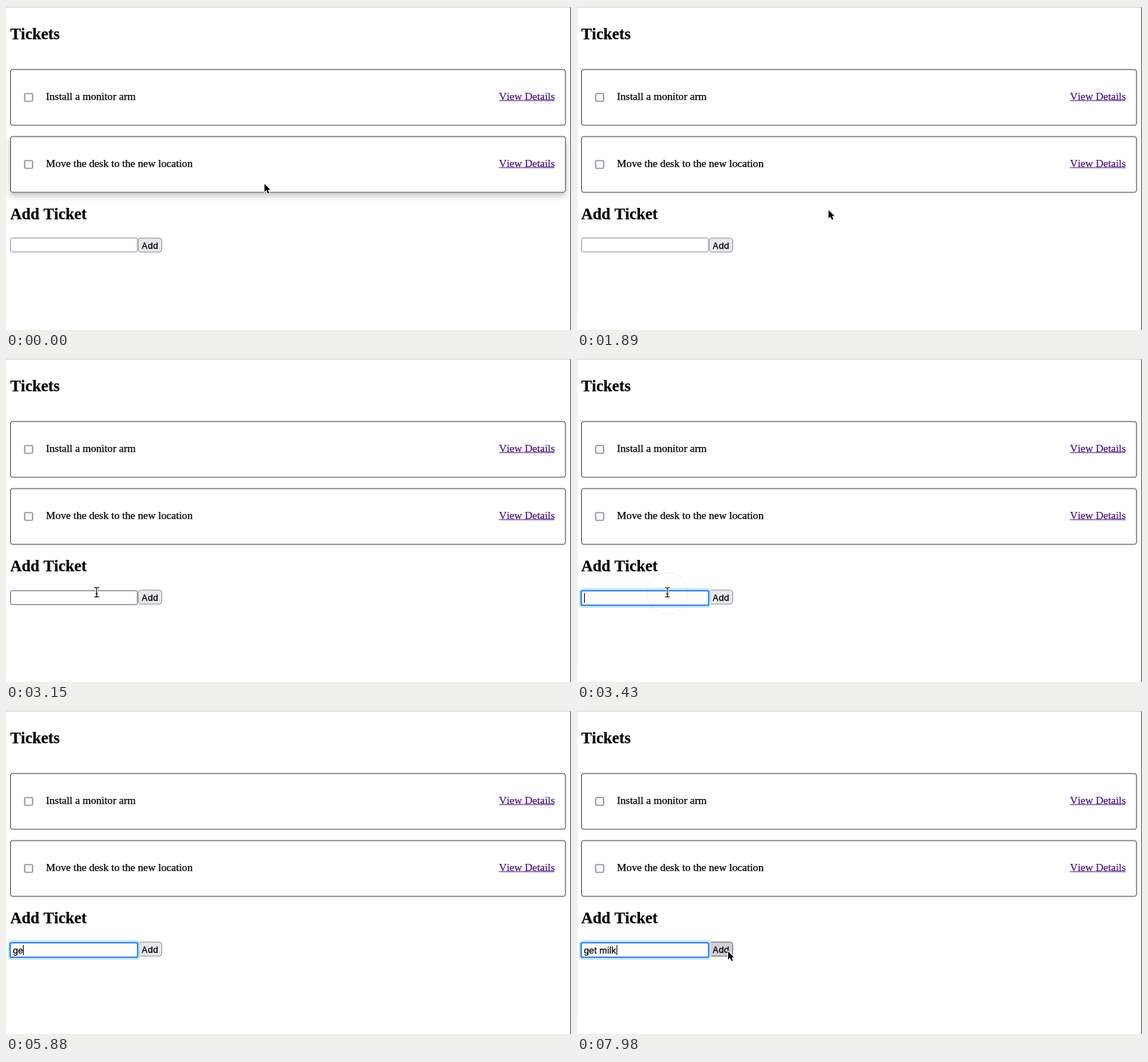
Recreate the animation shown at these times as an HTML page with a canvas. Size 800 by 459 pixels, loop 8 s.

```html
<!DOCTYPE html>
<html lang="en">
<head>
<meta charset="utf-8">
<title>Tickets</title>
<style>
  html, body { margin: 0; width: 100%; height: 100%; overflow: hidden; background: #fff; }
  canvas { display: block; width: 800px; height: 459px; }
</style>
</head>
<body>
<canvas id="stage" width="800" height="459"></canvas>
<script>
const ctx = document.getElementById('stage').getContext('2d');
const LOOP = 8000;
const SERIF = '"Liberation Serif", "Times New Roman", serif';
const SANS = 'Inter, "Liberation Sans", sans-serif';
const BODY = `15.08px ${SERIF}`, HEADING = `bold 22.56px ${SERIF}`;
const GREY = '#8f8f9d', DARK = '#5c5c68', LINK = '#4a1486';
const FOCUS = 3220, FIRST_KEY = 3640, MOUSE_BACK = 7210;

// [start, end, x, y]: the pointer arrives at x, y at the end time
const MOVES = [
  [0, 0, 366, 252],
  [50, 620, 357, 289],
  [1860, 2760, 133, 331],
  [2800, 3220, 128, 332],
  [MOUSE_BACK, 7940, 214, 342]
];

// [time, field content]
const KEYS = [
  [FOCUS, ''], [FIRST_KEY, 'g'], [3850, 'ge'], [4200, 'get'], [4410, 'get '],
  [4620, 'get'], [4900, 'ge'], [5110, 'g'], [5250, ''],
  [5600, 'g'], [5810, 'ge'], [6090, 'get'], [6230, 'get '], [6440, 'get m'],
  [6580, 'get mi'], [6720, 'get mil'], [6930, 'get milk']
];

const clamp = v => Math.max(0, Math.min(1, v));
const ease = v => v * v * (3 - 2 * v);

function pointerAt(t) {
  let [, , x, y] = MOVES[0];
  for (const [start, end, toX, toY] of MOVES.slice(1)) {
    const k = ease(clamp((t - start) / (end - start)));
    x += (toX - x) * k;
    y += (toY - y) * k;
  }
  return { x, y };
}

// A hairline stroke gives the text a slightly heavier weight
function text(str, x, y, font, color = '#000') {
  ctx.font = font;
  ctx.fillStyle = ctx.strokeStyle = color;
  ctx.lineWidth = 0.25;
  ctx.fillText(str, x, y);
  ctx.strokeText(str, x, y);
}

function box(x, y, w, h, r, stroke, fill, line = 1) {
  ctx.beginPath();
  ctx.roundRect(x, y, w, h, r);
  if (fill) {
    ctx.fillStyle = fill;
    ctx.fill();
  }
  ctx.strokeStyle = stroke;
  ctx.lineWidth = line;
  ctx.stroke();
}

function card(y, label, shadow) {
  if (shadow > 0) {
    ctx.save();
    ctx.shadowColor = `rgba(0,0,0,${0.24 * shadow})`;
    ctx.shadowBlur = 8;
    ctx.shadowOffsetY = 4;
    ctx.fillStyle = '#fff';
    ctx.beginPath();
    ctx.roundRect(6, y, 787, 80, 3);
    ctx.fill();
    ctx.restore();
  }
  box(6.4, y, 785.8, 79, 3, '#3c3c3c', '#fff');
  box(26.4, y + 34, 11.2, 11, 1.5, GREY, '#fff', 1.7);
  text(label, 56.5, y + 42.5, BODY);
  text('View Details', 698, y + 42.5, BODY, LINK);
  ctx.fillRect(698, y + 43.5, 78.5, 1);
}

function field(t, hover) {
  if (t < FOCUS) {
    box(6.5, hover ? 329.7 : 328.7, 179.5, 19.6, 2, hover ? DARK : GREY, '#fff');
    return;
  }
  box(4.5, 328, 183.8, 24, 4, '#bfe3ff', null, 3.4);
  box(5.9, 329.7, 180.5, 20.6, 2, '#0a68d8', '#fff', 1.6);
  const [time, value] = KEYS.filter(key => key[0] <= t).pop();
  text(value, 9.5, 344.5, `12.4px ${SANS}`);
  if ((t - time) % 1000 < 500) {
    ctx.fillRect(Math.round(9.5 + ctx.measureText(value).width), 333, 1, 14);
  }
}

function button(hover) {
  box(187.3, 328.8, 33.2, 19.9, 3.5, hover ? DARK : GREY, hover ? '#d0d0d7' : '#e9e9ed');
  text('Add', 192, 344.2, `12.3px ${SANS}`);
}

function outlined(path, fill) {
  ctx.lineJoin = 'round';
  ctx.strokeStyle = '#fff';
  ctx.lineWidth = fill ? 1.8 : 3;
  ctx.stroke(path);
  if (fill) {
    ctx.fillStyle = '#000';
    ctx.fill(path);
  } else {
    ctx.strokeStyle = '#111';
    ctx.lineWidth = 1.2;
    ctx.stroke(path);
  }
}

const ARROW = new Path2D('M0 0V11.6L2.7 9.1L4.7 13.7L6.7 12.8L4.8 8.4H8.4Z');
const BEAM = new Path2D('M-3.5-6.5H-1.5Q0-6.5 0-5Q0-6.5 1.5-6.5H3.5M0-5V5' +
  'M-3.5 6.5H-1.5Q0 6.5 0 5Q0 6.5 1.5 6.5H3.5M-1.7 2H1.7');

function pointer(p, beam) {
  ctx.save();
  ctx.translate(p.x, p.y);
  outlined(beam ? BEAM : ARROW, !beam);
  ctx.restore();
}

function ripple(t, x, y) {
  const k = (t - FOCUS) / 270;
  if (k < 0 || k > 1) return;
  ctx.beginPath();
  ctx.arc(x, y + 1, 33 * Math.sqrt(k), 0, 7);
  ctx.strokeStyle = 'rgba(0,0,0,.07)';
  ctx.lineWidth = 1;
  ctx.stroke();
}

function draw(t) {
  const p = pointerAt(t);
  const inRow = p.y >= 328 && p.y <= 350;
  const overField = inRow && p.x < 187;
  const overButton = inRow && p.x >= 187 && p.x <= 221;

  ctx.fillStyle = '#fff';
  ctx.fillRect(0, 0, 800, 459);
  ctx.fillStyle = '#f3f3f3';
  ctx.fillRect(0, 2, 1, 433);
  ctx.fillStyle = '#c4c4c4';
  ctx.fillRect(0, 1, 800, 1);
  ctx.fillStyle = '#555';
  ctx.fillRect(799, 2, 1, 457);

  text('Tickets', 6, 47, HEADING);
  card(90, 'Install a monitor arm', 0);
  card(185, 'Move the desk to the new location', 1 - ease(clamp((t - 230) / 300)));
  text('Add Ticket', 6, 302, HEADING);

  button(overButton);
  field(t, overField);
  ripple(t, p.x, p.y);
  if (t < FIRST_KEY || t > MOUSE_BACK) pointer(p, overField);
}

ctx.fontKerning = 'none';
const origin = performance.now();
function tick() {
  draw((performance.now() - origin) % LOOP);
  requestAnimationFrame(tick);
}
tick();
</script>
</body>
</html>
```
